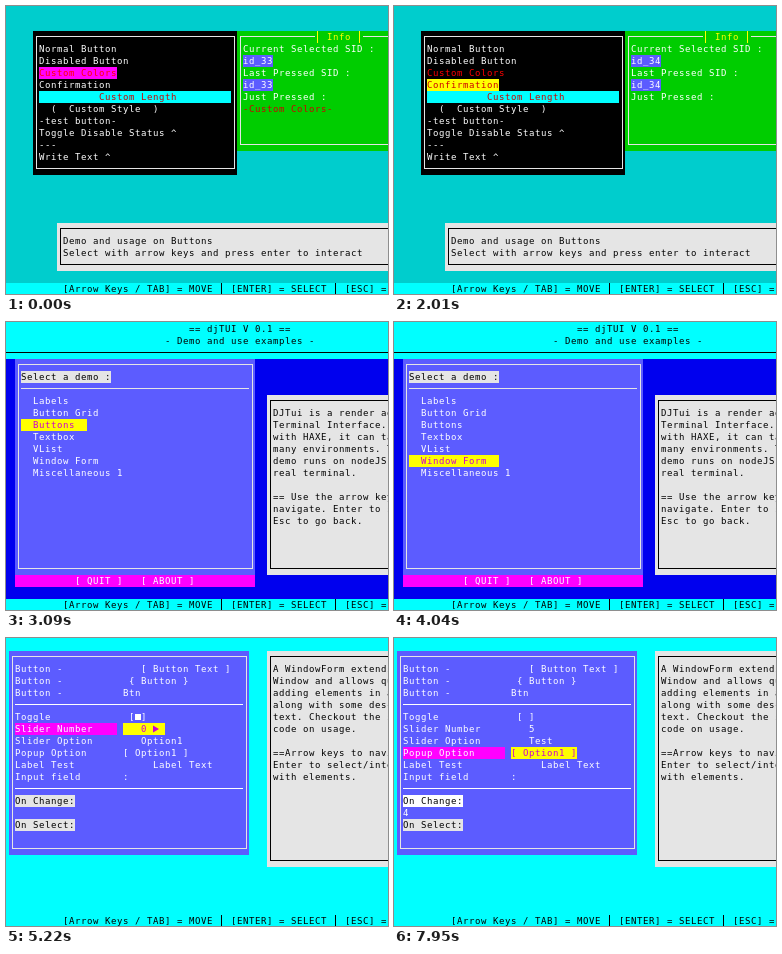
Write an HTML page that moves like this. It is 382x288 px and loops after 8 s.

```html
<!DOCTYPE html>
<html lang="en">
<head>
<meta charset="utf-8">
<title>Terminal UI demo</title>
<style>
html, body { margin: 0; width: 100%; height: 100%; overflow: hidden; background: #00cdcd; }
svg { display: block; }
text { font: 9px "DejaVu Sans Mono", monospace; white-space: pre; }
</style>
</head>
<body>
<svg id="stage" width="382" height="288" viewBox="0 0 382 288" shape-rendering="crispEdges"></svg>
<script>
const LOOP = 8000;
const C = {
  white: '#fff', grey: '#e5e5e5', black: '#000', teal: '#00cdcd', cyan: '#0ff',
  green: '#00cd00', navy: '#0000ee', blue: '#5c5cff', pink: '#f0f', plum: '#cd00cd',
  yellow: '#ff0', red: '#f00', dark: '#cd0000'
};

// Character grid: 6 x 12 pixel cells
const X = c => 3 + 6 * c;
const Y = r => 1 + 12 * r;
const esc = s => s.replace(/&/g, '&amp;').replace(/</g, '&lt;');

const rect = (x, y, w, h, fill) =>
  `<rect x="${x}" y="${y}" width="${w}" height="${h}" fill="${fill}"/>`;
const fill = (c, r, w, h, color) => rect(X(c), Y(r), 6 * w, 12 * h, color);
const rule = (c, r, w, color) => rect(X(c), Y(r) + 5, 6 * w, 1, color);
const bar = (c, r, color) => rect(X(c) + 2, Y(r), 1, 12, color);

// One character per cell
function text(c, r, str, color = C.white, bg) {
  const back = bg ? fill(c, r, str.length, 1, bg) : '';
  const xs = [...str].map((_, i) => X(c + i)).join(' ');
  return back + `<text x="${xs}" y="${Y(r) + 9}" fill="${color}">${esc(str)}</text>`;
}

const lines = (c, r, list, color) =>
  list.map((s, i) => s ? text(c, r + i, s, color) : '').join('');

function frame(c, r, w, h, color) {
  const x = X(c) + 3, y = Y(r) + 5, W = 6 * (w - 1), H = 12 * (h - 1);
  return rect(x, y, W + 1, 1, color) + rect(x, y + H, W + 1, 1, color) +
    rect(x, y, 1, H, color) + rect(x + W, y, 1, H, color);
}

const panel = (c, r, w, h, bg, line) => fill(c, r, w, h, bg) + frame(c, r, w, h, line);

function arrow(c, r, dir) {
  const mid = X(c) + 3, y = Y(r);
  return `<path d="M${mid - 3 * dir} ${y + 2.5}L${mid + 3 * dir} ${y + 6}L${mid - 3 * dir} ${y + 9.5}Z"
    fill="${C.plum}" shape-rendering="auto"/>`;
}

// Latest value of a list of [time, value] steps
function at(t, steps) {
  let value = steps[0][1];
  for (const [start, v] of steps) if (t >= start) value = v;
  return value;
}

function footer() {
  return fill(-1, 23, 65, 1, C.cyan) +
    text(9, 23, '[Arrow Keys / TAB] = MOVE', C.black) + bar(35, 23, C.black) +
    text(37, 23, '[ENTER] = SELECT', C.black) + bar(54, 23, C.black) +
    text(56, 23, '[ESC] =', C.black);
}

// ---- Buttons demo ----
const BUTTONS = ['Normal Button', 'Disabled Button', 'Custom Colors', 'Confirmation', '',
  '  (  Custom Style  )  ', '-test button-', 'Toggle Disable Status ^', '---', 'Write Text ^'];

function button(i, focus) {
  const r = 3 + i, on = i === focus;
  if (i === 4) {
    return fill(5, r, 32, 1, on ? C.yellow : C.cyan) + text(15, r, 'Custom Length', C.dark);
  }
  if (i === 2) return text(5, r, BUTTONS[i], C.red, on ? C.pink : '');
  return text(5, r, BUTTONS[i], on ? C.dark : C.white, on ? C.yellow : '');
}

function info(t) {
  const sid = at(t, [[0, 'id_33'], [310, 'id_34'], [2320, 'id_35'], [2480, 'id_36'], [2640, 'testbtn']]);
  const last = t < 2010 ? 'id_33' : 'id_34';
  return panel(38, 2, 40, 10, C.green, C.grey) + fill(51, 2, 8, 1, C.green) +
    bar(51, 2, C.yellow) + text(53, 2, 'Info', C.yellow) + bar(58, 2, C.yellow) +
    text(39, 3, 'Current Selected SID :') + text(39, 4, sid, C.white, C.blue) +
    text(39, 5, 'Last Pressed SID :') + text(39, 6, last, C.white, C.blue) +
    text(39, 7, 'Just Pressed :') +
    (t < 460 ? text(39, 8, '-Custom Colors-', C.dark) : '');
}

function popup(t) {
  if (t < 860 || t >= 2010) return '';
  const k = at(t, [[860, 0.25], [930, 0.5], [1010, 0.75], [1090, 1]]);
  if (k < 1) {
    const w = 2 * Math.round(15 * k), h = 2 * Math.round(3 * k);
    return fill(20 - w / 2, 10 - h / 2, w, h, C.red);
  }
  const yes = t >= 1700;
  const choice = (c, s, on) => text(c, 11, s, on ? C.plum : C.white, on ? C.yellow : '');
  return panel(5, 7, 30, 6, C.red, C.grey) + text(7, 9, 'Are you sure?') +
    choice(10, ' { YES } ', yes) + choice(22, ' { NO } ', !yes);
}

function buttonsScene(t) {
  const focus = at(t, [[0, 2], [310, 3], [860, -1], [2010, 3], [2320, 4], [2480, 5], [2640, 6]]);
  return rect(0, 0, 382, 288, C.teal) + panel(4, 2, 34, 12, C.black, C.grey) +
    BUTTONS.map((_, i) => button(i, focus)).join('') + info(t) +
    (t >= 2790 ? rect(231, 145, 89, 12, '#00eeee') : '') + popup(t) +
    panel(8, 18, 70, 4, C.grey, C.black) +
    lines(9, 19, ['Demo and usage on Buttons',
      'Select with arrow keys and press enter to interact'], C.black) + footer();
}

// ---- Main menu ----
const DEMOS = ['Labels', 'Button Grid', 'Buttons', 'Textbox', 'VList', 'Window Form', 'Miscellaneous 1'];

function menuScene(t) {
  const base = rect(0, 0, 382, 288, C.navy) + rect(0, 0, 382, 37, C.cyan) +
    text(30, 0, '== djTUI V 0.1 ==', C.black) +
    text(26, 1, '- Demo and use examples -', C.black) +
    rule(-1, 2, 65, C.black) + footer() + fill(1, 3, 40, 18, C.blue);
  if (t < 3090) return base;
  const focus = at(t, [[3090, 2], [3410, 3], [3640, 4], [4040, 5]]);
  return base + frame(1, 3, 40, 18, C.grey) +
    text(2, 4, 'Select a demo :', C.black, C.grey) + rule(2, 5, 38, C.grey) +
    DEMOS.map((s, i) => i === focus
      ? text(2, 6 + i, `  ${s}  `, C.plum, C.yellow)
      : text(4, 6 + i, s)).join('') +
    fill(1, 21, 40, 1, C.pink) + text(11, 21, '[ QUIT ]   [ ABOUT ]') +
    panel(43, 6, 40, 15, C.grey, C.black) +
    lines(44, 7, ['DJTui is a render agnostic', 'Terminal Interface. Built', 'with HAXE, it can target',
      'many environments. This', 'demo runs on nodeJS with a', 'real terminal.', '',
      '== Use the arrow keys to', 'navigate. Enter to select', 'Esc to go back.'], C.black);
}

// ---- Window form ----
const LABELS = ['Button -', 'Button -', 'Button -', '', 'Toggle', 'Slider Number',
  'Slider Option', 'Popup Option', 'Label Test', 'Input field'];
const OPTIONS = ['Option1', 'Option2', 'Option3', 'Option4', 'Test'];

function formScene(t) {
  const base = rect(0, 0, 382, 288, C.cyan) + footer() +
    fill(0, 1, 40, 17, C.blue) + fill(43, 1, 40, 18, C.grey);
  if (t < 4340) return base;

  const focus = at(t, [[4340, 2], [4660, 3], [4810, 4], [5000, 6], [5220, 7],
    [6550, 6], [6850, 7], [7020, 8], [7950, 9]]);
  const num = at(t, [[0, 0], [5680, 1], [5850, 2], [6010, 3], [6160, 4], [6320, 5]]);
  const opt = at(t, [[0, 0], [7180, 1], [7330, 2], [7490, 3], [7640, 4]]);
  const checked = t < 6700;
  const change = opt ? String(opt) : !checked ? 'false' : num ? String(num) : '';

  const ink = r => r === focus ? C.plum : C.white;
  const value = (r, s) => text(19, r, s, ink(r), r === focus ? C.yellow : '');
  const slider = (r, s, width, i, max) => value(r, '   ' + s.padEnd(width) + '   ') +
    (r === focus && i > 0 ? arrow(20, r, -1) : '') +
    (r === focus && i < max ? arrow(23 + width, r, 1) : '');

  return base + frame(0, 1, 40, 17, C.grey) + frame(43, 1, 40, 18, C.black) +
    LABELS.map((s, i) => s ? text(1, 2 + i, i + 2 === focus ? s.padEnd(17) : s,
      C.white, i + 2 === focus ? C.pink : '') : '').join('') +
    value(2, '   [ Button Text ]  ') + value(3, ' { Button } ') + value(4, 'Btn') +
    rule(1, 5, 38, C.white) +
    value(6, ' [ ] ') + (checked ? rect(X(21), Y(6) + 3, 6, 6, ink(6)) : '') +
    slider(7, String(num), 1, num, 10) + slider(8, OPTIONS[opt], 7, opt, 4) +
    value(9, '[ Option1 ]') + text(24, 10, 'Label Text') + text(19, 11, ':') +
    rule(1, 12, 38, C.white) +
    text(1, 13, 'On Change:', C.black, change ? C.white : C.grey) + text(1, 14, change) +
    text(1, 15, 'On Select:', C.black, C.grey) +
    lines(44, 2, ['A WindowForm extends a', 'Window and allows quickly', 'adding elements in a form',
      'along with some descriptive', 'text. Checkout the source', 'code on usage.', '',
      '==Arrow keys to navigate', 'Enter to select/interact', 'with elements.'], C.black);
}

const stage = document.getElementById('stage');
let shown = '';

function draw(now) {
  const t = now % LOOP;
  const svg = t < 3020 ? buttonsScene(t) : t < 4270 ? menuScene(t) : formScene(t);
  if (svg !== shown) stage.innerHTML = shown = svg;
}

let start;
function tick(now) {
  if (start === undefined) start = now;
  draw(now - start);
  requestAnimationFrame(tick);
}
draw(0);
requestAnimationFrame(tick);
</script>
</body>
</html>
```
